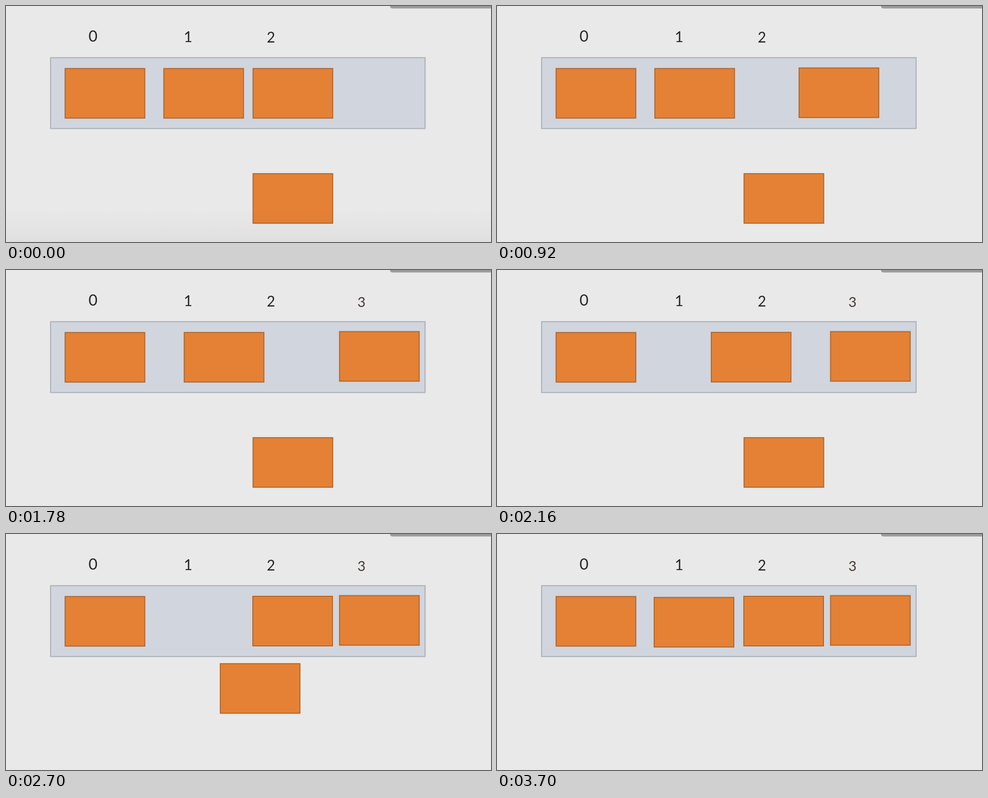
Recreate the animation shown at these times as an HTML page. Size 1071x523 px, loop 5.18 s.

```html
<!DOCTYPE html>
<html lang="en">
<head>
<meta charset="utf-8">
<title>Inserting into an array</title>
<style>
  html, body { margin: 0; height: 100%; overflow: hidden; background: #e9e9e9; }
  svg { display: block; width: 100%; height: 100%; }
  .cell { fill: #e58135; stroke: #a9632b; stroke-width: 2; }
  text { font-family: Lato, sans-serif; fill: #262626; text-anchor: middle; }
</style>
</head>
<body>
<svg viewBox="0 0 1071 523">
  <defs>
    <linearGradient id="shade" x2="0" y2="1">
      <stop stop-opacity="0"/>
      <stop offset="1" stop-opacity=".04"/>
    </linearGradient>
  </defs>
  <rect x="848" y="-10" width="240" height="15.5" rx="5" fill="#9b9b9b"/>
  <rect x="98.5" y="114.5" width="827" height="157" fill="#d1d5dd" stroke="#a5a9b1" stroke-width="2"/>
  <text x="192" y="79" font-size="34">0</text>
  <text x="402" y="80" font-size="33">1</text>
  <text x="585" y="81" font-size="32">2</text>
  <text id="three" x="785" y="82" font-size="31" style="fill:#4a3a35">3</text>
  <rect class="cell" x="130.5" y="138.5" width="176" height="110"/>
  <rect class="cell" id="inserted" width="176" height="110"/>
  <rect class="cell" id="second" width="176" height="110"/>
  <rect class="cell" id="third" width="176" height="110"/>
  <rect id="overlay" y="450" width="1071" height="73" fill="url(#shade)"/>
</svg>
<script>
const LOOP = 5180;
const RAMP = 0.25; // share of a move spent speeding up, and again slowing down

const moves = [
  { id: 'third', start: 179, length: 1232, from: [545.5, 138.5], to: [736.5, 136.5] },
  { id: 'second', start: 1410, length: 1250, from: [348.5, 138.5], to: [545, 138] },
  { id: 'inserted', start: 2180, length: 1308, from: [545.5, 371.5], to: [347, 140.5] },
];

const el = id => document.getElementById(id);
const progress = (t, start, length) => Math.min(1, Math.max(0, (t - start) / length));

function ease(u) {
  if (u > 0.5) return 1 - ease(1 - u);
  return u < RAMP ? u * u / (2 * RAMP * (1 - RAMP)) : (u - RAMP / 2) / (1 - RAMP);
}

function draw(now) {
  const t = now % LOOP;
  for (const { id, start, length, from, to } of moves) {
    const k = ease(progress(t, start, length));
    const [x, y] = from.map((a, i) => a + (to[i] - a) * k);
    el(id).setAttribute('x', x);
    el(id).setAttribute('y', y);
  }
  el('three').setAttribute('opacity', progress(t, 1240, 500));
  el('overlay').setAttribute('opacity', 1 - progress(t, 60, 200));
  requestAnimationFrame(() => draw(performance.now() - origin));
}

const origin = performance.now();
draw(0);
</script>
</body>
</html>
```
